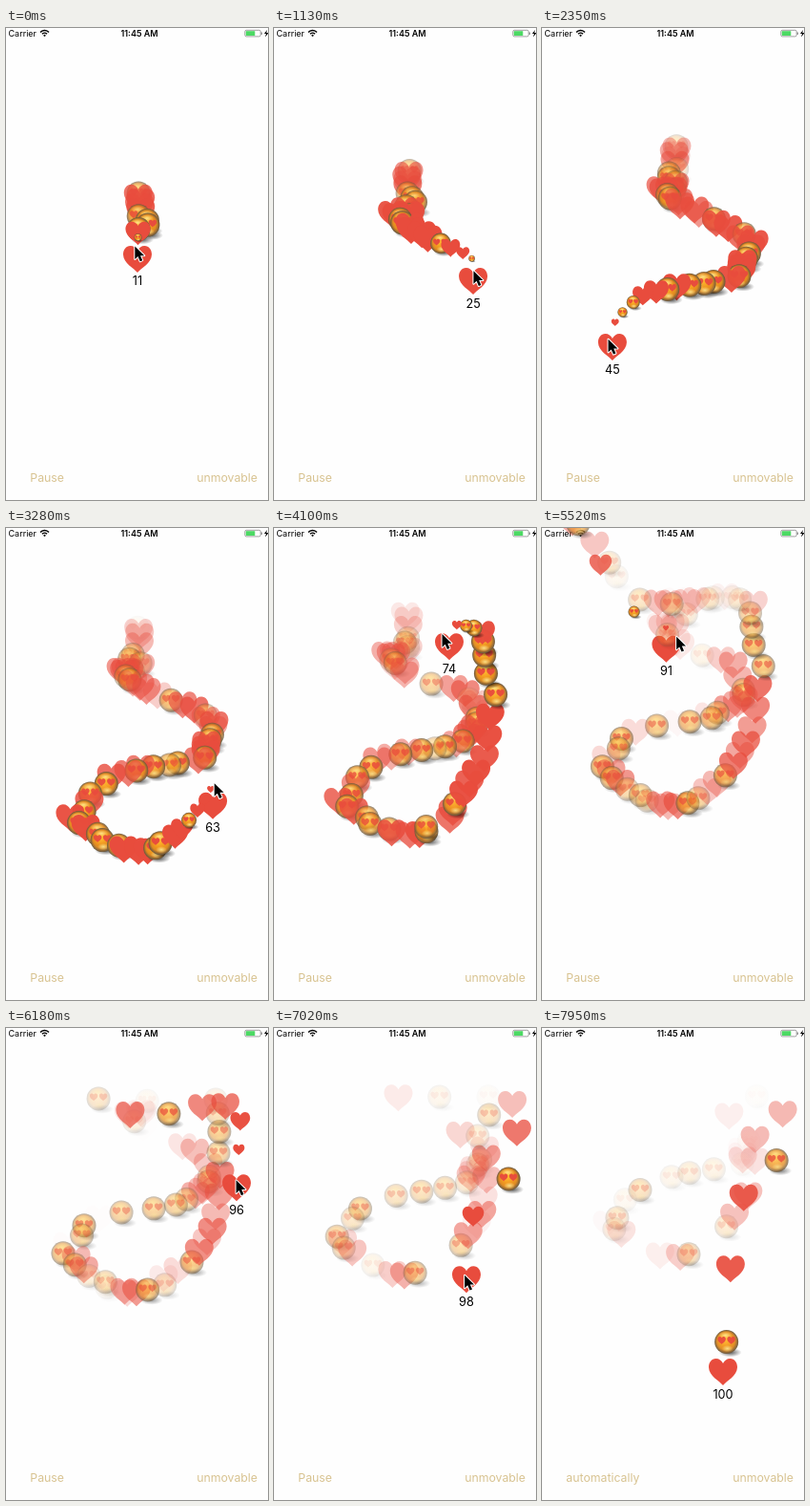
Write an HTML page with a canvas that moves like this. It is 275 px wide and 494 px high and loops after 8000 ms.

```html
<!DOCTYPE html>
<html lang="en">
<head>
<meta charset="utf-8">
<title>Floating hearts</title>
<style>
  html, body { margin: 0; width: 100%; height: 100%; overflow: hidden; background: #fefefe; }
  canvas { display: block; width: 100%; height: 100%; }
</style>
</head>
<body>
<canvas id="stage"></canvas>
<script>
const W = 275, H = 494, LOOP = 8; // px, px, seconds
const RED = '#e84c3d', GOLD = '#d8c391';
const RISE = 21;                  // px per second
const canvas = document.getElementById('stage');
const ctx = canvas.getContext('2d');
const density = window.devicePixelRatio || 1;
canvas.width = W * density;
canvas.height = H * density;

// Turning points of the drag: [seconds, x, y]
const drag = [
  [-2.5, 140, 243], [0, 138, 242], [0.25, 125, 236], [0.7, 148, 247], [1.13, 209, 265],
  [1.65, 198, 296], [2.15, 103, 307], [2.35, 74, 334], [2.48, 74, 347], [2.85, 145, 369],
  [3.28, 217, 291], [3.7, 222, 160], [3.95, 205, 128], [4.6, 105, 118], [4.87, 60, 67],
  [5.15, 32, 22], [5.45, 110, 122], [5.9, 236, 112], [6.18, 242, 167], [6.45, 246, 192],
  [6.8, 208, 224], [7.15, 200, 291], [7.42, 190, 360]
];
// Pace of release: [seconds, total]
const pace = [[-2.5, 0], [0, 11.2], [1.13, 25.3], [2.35, 45.4], [3.28, 63.4], [4.87, 85.4], [6.1, 96], [7.5, 100]];

const clamp = (v, lo = 0, hi = 1) => Math.min(hi, Math.max(lo, v));
const noise = n => { const s = Math.sin(n * 127.1 + 3.7) * 43758.5453; return s - Math.floor(s); };

function lerpKeys(keys, v, from, to) {
  const next = keys.findIndex(k => k[from] > v);
  const i = next < 0 ? keys.length - 1 : Math.max(1, next);
  const a = keys[i - 1], b = keys[i];
  return a[to] + (b[to] - a[to]) * clamp((v - a[from]) / (b[from] - a[from]));
}

// Smooth curve through the turning points
function heartAt(t) {
  const last = drag.length - 1;
  if (t >= drag[last][0]) return drag[last].slice(1);
  const i = Math.max(1, drag.findIndex(k => k[0] > t));
  const a = drag[i - 1], b = drag[i];
  const before = drag[Math.max(0, i - 2)], after = drag[Math.min(last, i + 1)];
  const span = b[0] - a[0], u = clamp((t - a[0]) / span);
  return [1, 2].map(d => {
    const va = (b[d] - before[d]) / (b[0] - before[0]) * span;
    const vb = (after[d] - a[d]) / (after[0] - a[0]) * span;
    return a[d] * (1 + 2 * u) * (1 - u) ** 2 + va * u * (1 - u) ** 2
      + b[d] * u * u * (3 - 2 * u) + vb * u * u * (u - 1);
  });
}

const particles = Array.from({ length: 100 }, (_, i) => {
  const born = lerpKeys(pace, i + 1, 1, 0);
  const [x, heartY] = heartAt(born);
  const y = heartY - 22;
  return {
    born, x, y,
    face: noise(i) < 0.45,
    sway: 18 * noise(i + 200) - 4,
    life: clamp((y - 70) / RISE, 0.8, 3 + 4.5 * noise(i + 400))
  };
});

const heartShape = new Path2D(
  'M0 14C-3 10-15 4-15-5C-15-10-12-14-7.5-14C-4-14-1.5-12 0-9C1.5-12 4-14 7.5-14C12-14 15-10 15-5C15 4 3 10 0 14Z');
const cursorShape = new Path2D('M0 0V16L3.7 12.5L6.4 18.6L9.3 17.3L6.7 11.4H11.6Z');
const boltShape = new Path2D('M274 2L271 6H273L272 9.5L275.5 5H273.3Z');

function radial(x, y, r, ...colors) {
  const gradient = ctx.createRadialGradient(x, y, 0, 0, 0, r);
  colors.forEach((color, i) => gradient.addColorStop(i / (colors.length - 1), color));
  return gradient;
}
const ball = radial(-2, -4, 12.5, '#ffc430', '#fbb02a', '#f39a1f', '#e08a20', '#66563f');
const shade = radial(0, 0, 12, '#000a', '#0000');
const glow = radial(0, 0, 6, '#fff3a0cc', '#fff3a000');

function at(x, y, scaleX, scaleY, paint) {
  ctx.save();
  ctx.translate(x, y);
  ctx.scale(scaleX, scaleY);
  paint();
  ctx.restore();
}

function disc(x, y, r, fill) {
  ctx.fillStyle = fill;
  ctx.beginPath();
  ctx.arc(x, y, r, 0, Math.PI * 2);
  ctx.fill();
}

function drawHeart() {
  ctx.fillStyle = RED;
  ctx.fill(heartShape);
}

function drawFace() {
  at(4, 11, 1, 0.4, () => disc(0, 0, 12, shade));
  disc(0, 0, 12.5, ball);
  at(-1, -7, 1.2, 0.6, () => disc(0, 0, 6, glow));
  at(1, 7, 1, 0.6, () => disc(0, 0, 6, glow));
  for (const side of [-1, 1]) at(side * 5, -1.5, 0.28, 0.28, drawHeart);
}

function text(value, x, y, size, color = '#000', align = 'left', weight = 400) {
  ctx.font = `${weight} ${size}px Inter, Roboto, sans-serif`;
  ctx.textAlign = align;
  ctx.fillStyle = color;
  ctx.fillText(value, x, y);
}

function drawStatusBar() {
  text('Carrier', 2.5, 9, 9);
  text('11:45 AM', 140, 9, 9, '#000', 'center', 600);
  ctx.strokeStyle = '#000';
  ctx.lineWidth = 1.4;
  for (const r of [3.4, 6]) {
    ctx.beginPath();
    ctx.arc(40.5, 8.5, r, -Math.PI * 0.77, -Math.PI * 0.23);
    ctx.stroke();
  }
  disc(40.5, 7.8, 1.1, '#000');
  ctx.strokeStyle = '#777';
  ctx.lineWidth = 0.7;
  ctx.beginPath();
  ctx.roundRect(250.8, 2.3, 16.4, 6.6, 1.5);
  ctx.stroke();
  ctx.fillStyle = '#4cd964';
  ctx.fillRect(251.8, 3.2, 9.5, 4.8);
  ctx.fillStyle = '#777';
  ctx.fillRect(267.8, 4.5, 1, 2.4);
  ctx.fillStyle = '#000';
  ctx.fill(boltShape);
}

function drawParticle(p, t) {
  const age = t - p.born;
  if (age < 0 || age >= p.life) return;
  const scale = 0.2 + 0.8 * clamp(age / 0.32);
  ctx.globalAlpha = clamp(1.12 * (1 - age / p.life));
  at(p.x + p.sway * Math.sin(age * 1.25), p.y - RISE * age, scale, scale, p.face ? drawFace : drawHeart);
  ctx.globalAlpha = 1;
}

function drawCursor(t) {
  const [x, y] = heartAt(t + 0.04); // the finger leads the heart a little
  at(x - 1.5, y - 13, 0.85, 0.85, () => {
    ctx.lineJoin = 'round';
    ctx.lineWidth = 2.4;
    ctx.strokeStyle = '#fff';
    ctx.stroke(cursorShape);
    ctx.fillStyle = '#000';
    ctx.fill(cursorShape);
  });
}

function draw(t) {
  ctx.setTransform(density, 0, 0, density, 0, 0);
  ctx.fillStyle = '#fefefe';
  ctx.fillRect(0, 0, W, H);
  drawStatusBar();
  const dragging = t < 7.5;
  text(dragging ? 'Pause' : 'automatically', 25.3, 475, 12.3, GOLD);
  text('unmovable', 264, 475, 12.3, GOLD, 'right');

  const [x, y] = heartAt(t);
  at(x, y, 1, 1, drawHeart);
  text(Math.floor(lerpKeys(pace, t, 0, 1)), x, y + 27.5, 12.7, '#000', 'center');
  particles.forEach(p => drawParticle(p, t));
  if (dragging) drawCursor(t);
}

const start = performance.now();
function tick() {
  draw((performance.now() - start) / 1000 % LOOP);
  requestAnimationFrame(tick);
}
tick();
</script>
</body>
</html>
```
